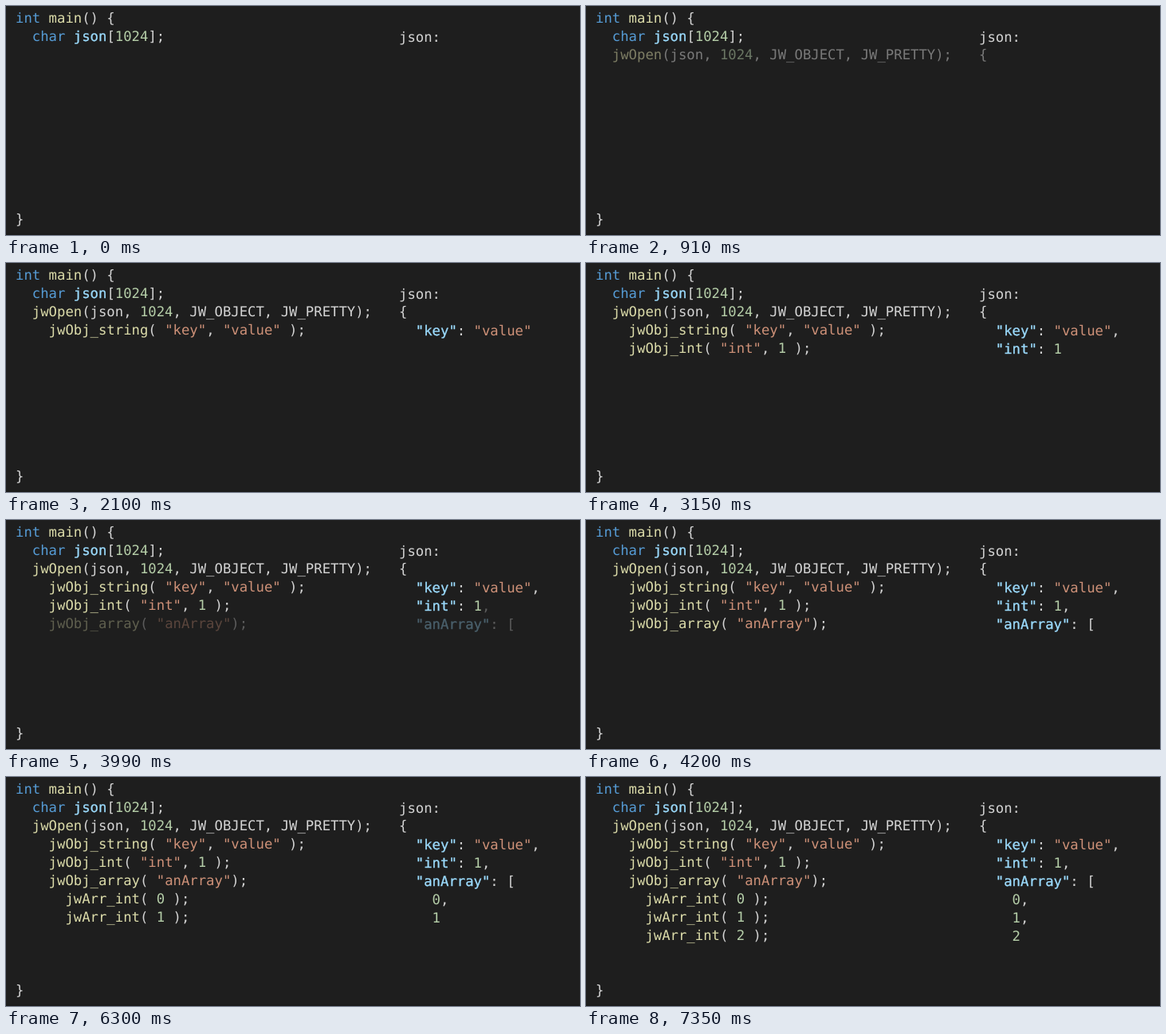
Animation, 720 px wide and 288 px high, one loop 8000 ms. Source, as an HTML page:

```html
<!DOCTYPE html>
<html lang="en">
<head>
<meta charset="utf-8">
<title>JSON writer walkthrough</title>
<style>
  html, body { margin: 0; width: 100%; height: 100%; overflow: hidden; background: #1e1e1e; }
  svg { display: block; width: 720px; height: 288px; }
  text {
    font: 17.28px "DejaVu Sans Mono", monospace;
    white-space: pre;
    text-rendering: geometricPrecision;
    fill: #d4d4d4;
  }
  .name { fill: #9cdcfe; stroke: #9cdcfe; stroke-width: .3px; }
  .string { fill: #ce9178; }
  .number { fill: #b5cea8; }
  .keyword { fill: #569cd6; }
  .call { fill: #dcdcaa; }
</style>
</head>
<body>
<svg id="stage" viewBox="0 0 720 288">
  <rect width="720" height="288" fill="#1e1e1e"/>
  <rect y="286" width="720" height="2" fill="#1a1a1a"/>
</svg>
<script>
const LOOP = 8000, TICK = 70, FADE = 280, LINE = 23;
const stage = document.getElementById("stage");

// Each step: fade start in ms, line of C code, line of JSON output
const steps = [
  [770, "  jwOpen(json, 1024, JW_OBJECT, JW_PRETTY);", "{"],
  [1795, '    jwObj_string( "key", "value" );', '  "key": "value"'],
  [2845, '    jwObj_int( "int", 1 );', '  "int": 1'],
  [3895, '    jwObj_array( "anArray");', '  "anArray": ['],
  [4970, "      jwArr_int( 0 );", "    0"],
  [6020, "      jwArr_int( 1 );", "    1"],
  [7070, "      jwArr_int( 2 );", "    2"],
];

const TOKENS = /(?<name>"\w+"(?=:)|\bjson(?=\[))|(?<string>"\w+")|(?<number>\b\d+\b)|(?<keyword>\b(?:int|char)\b)|(?<call>\w+(?=\())/g;

function highlight(code) {
  return code.replace(TOKENS, (token, ...rest) => {
    const groups = rest.at(-1);
    const kind = Object.keys(groups).find(key => groups[key]);
    return `<tspan class="${kind}">${token}</tspan>`;
  });
}

const textAt = (x, y, code) => `<text x="${x}" y="${y}" xml:space="preserve">${highlight(code)}</text>`;
const codeLine = (row, code) => textAt(12, 21 + row * LINE, code);
const jsonLine = (row, code) => textAt(493, (code === "{" ? 21 : 22) + row * LINE, code);

function addGroup(markup) {
  const group = document.createElementNS("http://www.w3.org/2000/svg", "g");
  group.innerHTML = markup;
  return stage.appendChild(group);
}

addGroup(codeLine(0, "int main() {") + codeLine(1, "  char json[1024];") +
  codeLine(11, "}") + jsonLine(1, "json:"));

const groups = steps.map(([, code, json], i) => {
  const row = i + 2;
  let markup = codeLine(row, code) + jsonLine(row, json);
  // A new entry also brings the comma after the previous one
  const previous = i ? steps[i - 1][2] : "{";
  if (!/[{[]$/.test(previous)) markup += jsonLine(row - 1, " ".repeat(previous.length) + ",");
  return addGroup(markup);
});

function draw(now) {
  const time = Math.floor((now % LOOP) / TICK) * TICK;
  groups.forEach((group, i) => {
    const alpha = (time - steps[i][0]) / FADE;
    group.setAttribute("opacity", Math.min(1, Math.max(0, alpha)));
  });
}

const start = performance.now();
function frame() {
  draw(performance.now() - start);
  requestAnimationFrame(frame);
}
frame();
</script>
</body>
</html>
```
